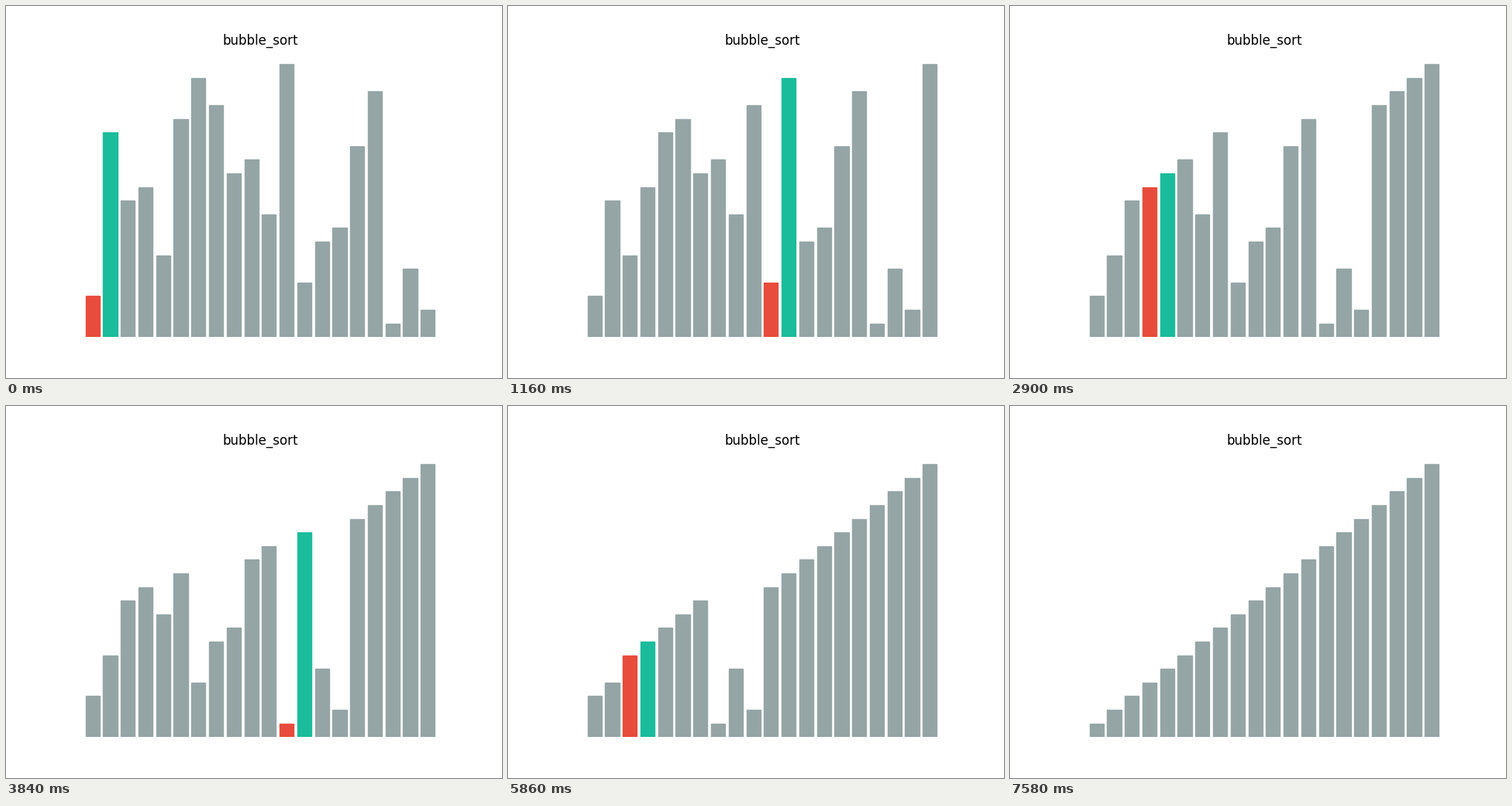
These frames come from a looping animation (640x480 px, 7.6 s). A matplotlib script:

```python
import matplotlib.pyplot as plt
from matplotlib.animation import FuncAnimation

VALUES = [3, 15, 10, 11, 6, 16, 19, 17, 12, 13, 9, 20, 4, 7, 8, 14, 18, 1, 5, 2]
GREY, RED, GREEN = "#95a5a6", "#e74c3c", "#1abc9c"


def bubble_sort(values):
    """Yield the list and the compared index, before and after each swap."""
    a = list(values)
    for end in range(len(a) - 1, 0, -1):
        for j in range(end):
            yield a[:], j
            if a[j] > a[j + 1]:
                a[j], a[j + 1] = a[j + 1], a[j]
            yield a[:], j
    yield a[:], None


# The opening state is skipped, so the loop starts after the first comparison.
steps = list(bubble_sort(VALUES))[1:]

fig, ax = plt.subplots(figsize=(6.4, 4.8), dpi=100)
ax.axis("off")
ax.set_title("bubble_sort")
bars = ax.bar(range(len(VALUES)), VALUES, width=0.8, linewidth=1)


def draw(i):
    heights, j = steps[i]
    for k, (bar, height) in enumerate(zip(bars, heights)):
        bar.set_height(height)
        bar.set_color(GREY)
        if j is not None and k in (j, j + 1):
            bar.set_color(RED if k == j else GREEN)
    return list(bars)


anim = FuncAnimation(fig, draw, frames=len(steps), interval=20,
                     repeat=True, repeat_delay=0)
plt.show()
```
